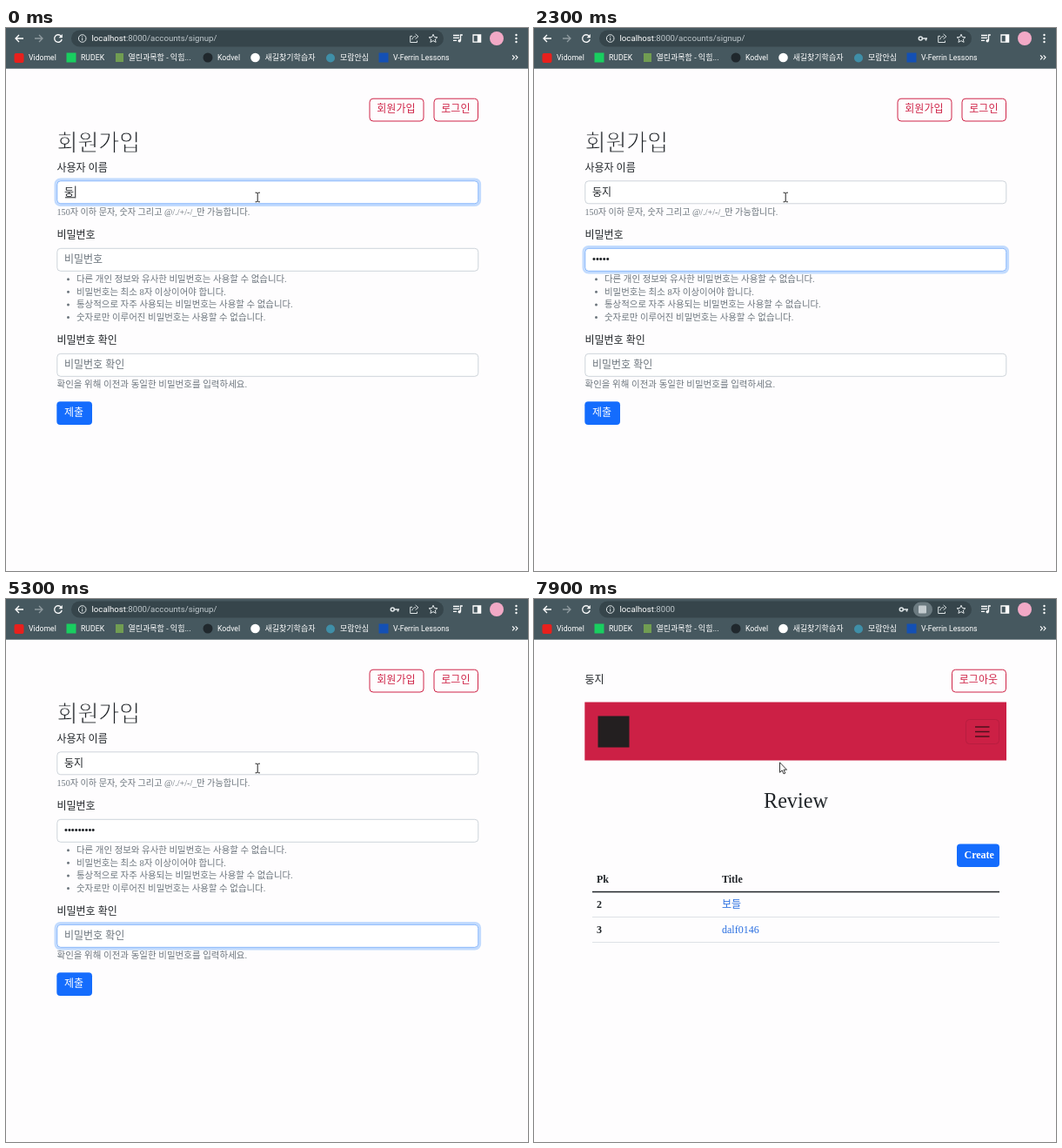
These frames come from a looping animation (600x624 px, 8000 ms). An HTML page:

```html
<!DOCTYPE html>
<html lang="ko">
<head>
<meta charset="utf-8">
<title>회원가입</title>
<style>
  html, body { margin: 0; width: 100%; height: 100%; overflow: hidden; background: #fefdfe; }
  svg { display: block; width: 600px; height: 624px; }
  text { font-family: 'Liberation Serif', 'Noto Sans CJK KR', 'Noto Sans CJK', serif; fill: #212529; white-space: pre; }
  .ui { font-family: Roboto, 'Noto Sans CJK KR', 'Noto Sans CJK', sans-serif; fill: #fff; }
  .dots { font-family: 'Liberation Sans', sans-serif; }
  .thin { stroke: #fefdfe; stroke-width: .8; }
  .mute { fill: #6c757d; }
  .red { fill: #cf2448; }
  .link { fill: #2a6fe0; }
  .white { fill: #fff; }
  .line { fill: none; stroke: #fff; stroke-width: 1.3; }
</style>
</head>
<body>
<svg id="stage" viewBox="0 0 600 624" xmlns="http://www.w3.org/2000/svg"></svg>
<script>
const LOOP = 8000;

// Text is placed by its left edge and vertical centre.
const text = (x, cy, str, size = 12, cls = '', extra = '') => {
  const drop = cls === 'ui' ? 0.355 : 0.4;
  return `<text x="${x}" y="${(cy + size * drop).toFixed(2)}" font-size="${size}" class="${cls}" ${extra}>${str}</text>`;
};
const rect = (x, y, w, h, fill, r = 0, extra = '') =>
  `<rect x="${x}" y="${y}" width="${w}" height="${h}" rx="${r}" fill="${fill}" ${extra}/>`;
const dot = (x, y, r, fill) => `<circle cx="${x}" cy="${y}" r="${r}" fill="${fill}"/>`;
const path = (d, extra = '') => `<path class="line" d="${d}" ${extra}/>`;
const group = (id, body) => `<g id="${id}">${body}</g>`;
const outline = (x, w, label) =>
  rect(x + 0.5, 81.2, w - 1, 25.8, 'none', 4, 'stroke="#cf2448"') + text(x + 8.8, 92.5, label, 12, 'red');

const fields = [
  { y: 175.5, cy: 188, hint: '', from: -1000, to: 800, taps: [0, 200, 400] },
  { y: 253, cy: 265, hint: '비밀번호', from: 800, to: 4700,
    taps: [1100, 1300, 1500, 1600, 1800, 2900, 3400, 3900, 4100] },
  { y: 374, cy: 386, hint: '비밀번호 확인', from: 4700, to: 1e5,
    taps: [5500, 5600, 5700, 6000, 6200, 6400, 6500, 6600, 6800] }
];
const names = ['둥', '둥ㅈ', '둥지'];
const BULLET = 11.2;

const field = (f, i) =>
  rect(58.8, f.y + 0.3, 484, 26, '#fff', 4, 'stroke="#ced4da"') +
  group('ring' + i,
    rect(57, f.y - 1.5, 487.6, 29.6, 'none', 5.5, 'stroke="#c2dbfe" stroke-width="3"') +
    rect(58.8, f.y + 0.3, 484, 26, '#fff', 4, 'stroke="#86b7fe"')) +
  text(67, f.cy, f.hint, 12, 'mute', `id="hint${i}"`) +
  text(67, f.cy, '', i ? BULLET : 12, i ? 'dots' : '', `id="val${i}"`) +
  rect(67, f.cy - 6.5, 1, 14, '#212529', 0, `id="caret${i}"`);

function browser() {
  const marks = [
    [26, 'Vidomel', 8.7], [86, 'RUDEK', 8.7], [140.5, '열린과목함 - 익힘...', 9], [243, 'Kodvel', 8.7],
    [297.5, '새길찾기학습자', 9], [384, '모람안심', 9], [445, 'V-Ferrin Lessons', 8.7]
  ];
  const soft = 'style="stroke:#dfe5e7;stroke-width:1"';
  const key = '<circle class="line" cx="444.3" cy="12" r="2" style="stroke:#dfe5e7;stroke-width:1.6"/>' +
    path('M446.5 12H452M450.5 12v2.6', 'style="stroke:#dfe5e7;stroke-width:1.7"');
  return rect(0, 0, 600, 46.7, '#46585f') + rect(75, 2.5, 428, 19, '#36454b', 9.5) +
    path('M20 12H11M15 8l-4 4 4 4') +
    path('M33 12h9M38 8l4 4-4 4', 'style="stroke:#8f9ba0"') +
    group('reload', path('M63.3 9.3A4.3 4.3 0 1 0 64.2 13') + '<path d="M64.8 7v4.2h-4.2z" fill="#fff"/>') +
    group('stop', path('M56.4 8.4l7.2 7.2M63.6 8.4l-7.2 7.2')) +
    path('M92 12a4.3 4.3 0 1 0-8.6 0a4.3 4.3 0 1 0 8.6 0M87.7 11.4V14.4M87.7 9.3v1.1', soft) +
    text(98.5, 12, 'localhost<tspan fill="#c0c9cd">:8000<tspan id="route">/accounts/signup/</tspan></tspan>', 9.67, 'ui') +
    group('translate', rect(436, 3.5, 22, 17, '#6b7a80', 8.5) + rect(442, 7.5, 9, 9, '#c3cbcf', 1)) +
    group('key', key) +
    path('M467 9.3H464.7V16.5H472.5V14.6M466.8 13.3C467.3 10.5 469 9.7 471 9.7M470.6 7l3.3 2.8-3.3 2.8', soft) +
    path('M491 7.2l1.4 3.2 3.5.3-2.6 2.3.8 3.4-3.1-1.8-3.1 1.8.8-3.4-2.6-2.3 3.5-.3z', soft) +
    path('M514 8.5h7M514 11.4h7M514 14.3h4M522.5 14.5V8h2.3') + dot(521.2, 14.7, 1.7, '#fff') +
    path('M537 8h8.6v8.2H537z') + rect(541.8, 8, 3.8, 8.2, '#fff') +
    dot(564, 12, 8, '#f2a9c6') +
    [8, 12, 16].map(y => dot(586.5, y, 1.2, '#fff')).join('') +
    rect(9.5, 29, 11, 11, '#e8201d', 2) + rect(69.5, 28.5, 11, 11, '#19ce60') +
    rect(126, 29, 9, 10, '#719d52') + dot(232, 34, 5.5, '#20282d') +
    dot(286.5, 34, 5.3, '#fff') + dot(373, 34.5, 5, '#3f8fa8') + rect(428.5, 28.5, 11, 11, '#1450b4') +
    marks.map(([x, s, size]) => text(x, 34, s, size, 'ui')).join('') +
    path('M582 31.3l2.4 2.5-2.4 2.5M585.6 31.3l2.4 2.5-2.4 2.5', 'style="stroke-width:1.1"');
}

function signup() {
  const rules = [
    '다른 개인 정보와 유사한 비밀번호는 사용할 수 없습니다.', '비밀번호는 최소 8자 이상이어야 합니다.',
    '통상적으로 자주 사용되는 비밀번호는 사용할 수 없습니다.', '숫자로만 이루어진 비밀번호는 사용할 수 없습니다.'
  ];
  return outline(417.5, 63, '회원가입') + outline(491.5, 51.5, '로그인') +
    text(58.5, 130.5, '회원가입', 26, 'thin') +
    text(58.5, 160, '사용자 이름') + text(58.5, 237.2, '비밀번호') + text(58.5, 358.5, '비밀번호 확인') +
    fields.map(field).join('') +
    text(58.5, 211, '150자 이하 문자, 숫자 그리고 @/./+/-/_만 가능합니다.', 10.15, 'mute') +
    rules.map((s, i) => dot(71.5, 288.7 + i * 14.6, 1.5, '#6c757d') +
      text(81, 288 + i * 14.6, s, 10.45, 'mute')).join('') +
    text(58.5, 409, '확인을 위해 이전과 동일한 비밀번호를 입력하세요.', 10.5, 'mute') +
    rect(58.3, 429.2, 40.7, 26.8, '#146cfd', 4) + text(67, 441.5, '제출', 12, 'white') +
    rect(68, 194.3, 11, 1, '#212529', 0, 'id="compose"');
}

function home() {
  const bold = 'font-weight="700"';
  const row = (y, pk, title) => text(72, y, pk, 12, '', bold) + text(216, y, title, 12, 'link');
  return text(58.5, 92.5, '둥지') + outline(480, 63, '로그아웃') +
    rect(58.3, 118.5, 484.7, 67, '#cc2045') + rect(73.5, 134.5, 36, 36, '#231f20') +
    rect(496.5, 138.5, 38, 28, 'none', 4, 'stroke="#b81d3f"') +
    path('M507 147h16.5M507 152.5h16.5M507 158h16.5', 'style="stroke:#4d101d;stroke-width:1.5"') +
    text(264, 230.5, 'Review', 24.2) +
    rect(486, 281.5, 49, 26.5, '#146cfd', 4) + text(494.5, 293.6, 'Create', 12, 'white', bold) +
    text(72, 321, 'Pk', 12, '', bold) + text(216, 321, 'Title', 12, '', bold) +
    rect(67, 335.8, 468, 1.5, '#212529') + rect(67, 365, 468, 1, '#dee2e6') + rect(67, 394, 468, 1, '#dee2e6') +
    row(350, '2', '보들') + row(379, '3', 'dalf0146');
}

const pointers =
  group('ibeam', path('M286.5 189.2h1.8l.9.9.9-.9h1.8M289.2 190v9M286.5 199.8h1.8l.9-.9.9.9h1.8', 'style="stroke:#222;stroke-width:1"')) +
  group('arrow', '<path d="M282.5 187.8v11.5l2.7-2.4 1.8 4 1.8-.8-1.8-3.9h3.5z" fill="#fff" stroke="#222" stroke-width=".9"/>');

document.getElementById('stage').innerHTML =
  browser() + group('signup', signup()) + group('home', home()) + pointers;

const el = id => document.getElementById(id);
const show = (id, on) => { el(id).style.display = on ? '' : 'none'; };

const SUBMIT = 7100, POINTER = 7400, ARRIVE = 7700, LOADED = 7800;

// Focus glow fades over 150 ms, just after the focus moves.
function fade(ms) {
  const p = Math.min(1, Math.max(0, (ms - 60) / 150));
  return p * p * (3 - 2 * p);
}

function render(t) {
  const arrived = t >= ARRIVE;
  const loading = t >= SUBMIT && t < LOADED;
  show('signup', !arrived);
  show('home', arrived);
  show('route', !arrived);
  show('translate', arrived);
  show('reload', !loading);
  show('stop', loading);
  show('ibeam', t < POINTER);
  show('arrow', t >= POINTER);
  show('key', t >= fields[1].taps[0]);
  el('key').setAttribute('transform', `translate(${arrived ? -22 : 0} 0)`);

  fields.forEach((f, i) => {
    const typed = f.taps.filter(k => k <= t);
    const n = typed.length;
    el('ring' + i).style.opacity = fade(t - f.from) * (1 - fade(t - f.to));
    el('val' + i).textContent = i ? '•'.repeat(n) : names[n - 1];
    show('hint' + i, n === 0);

    const since = t - Math.max(f.from, ...typed);
    show('caret' + i, t >= f.from && t < f.to && since % 1000 < 500);
    const width = i ? n * BULLET * 0.35 : names[n - 1].length * 11.04 + 1.2;
    el('caret' + i).setAttribute('x', 67 + width);
  });

  show('compose', t < 700);
  el('compose').setAttribute('x', t < 200 ? 68 : 79);
}

function tick() {
  render(performance.now() % LOOP);
  requestAnimationFrame(tick);
}
tick();
</script>
</body>
</html>
```
